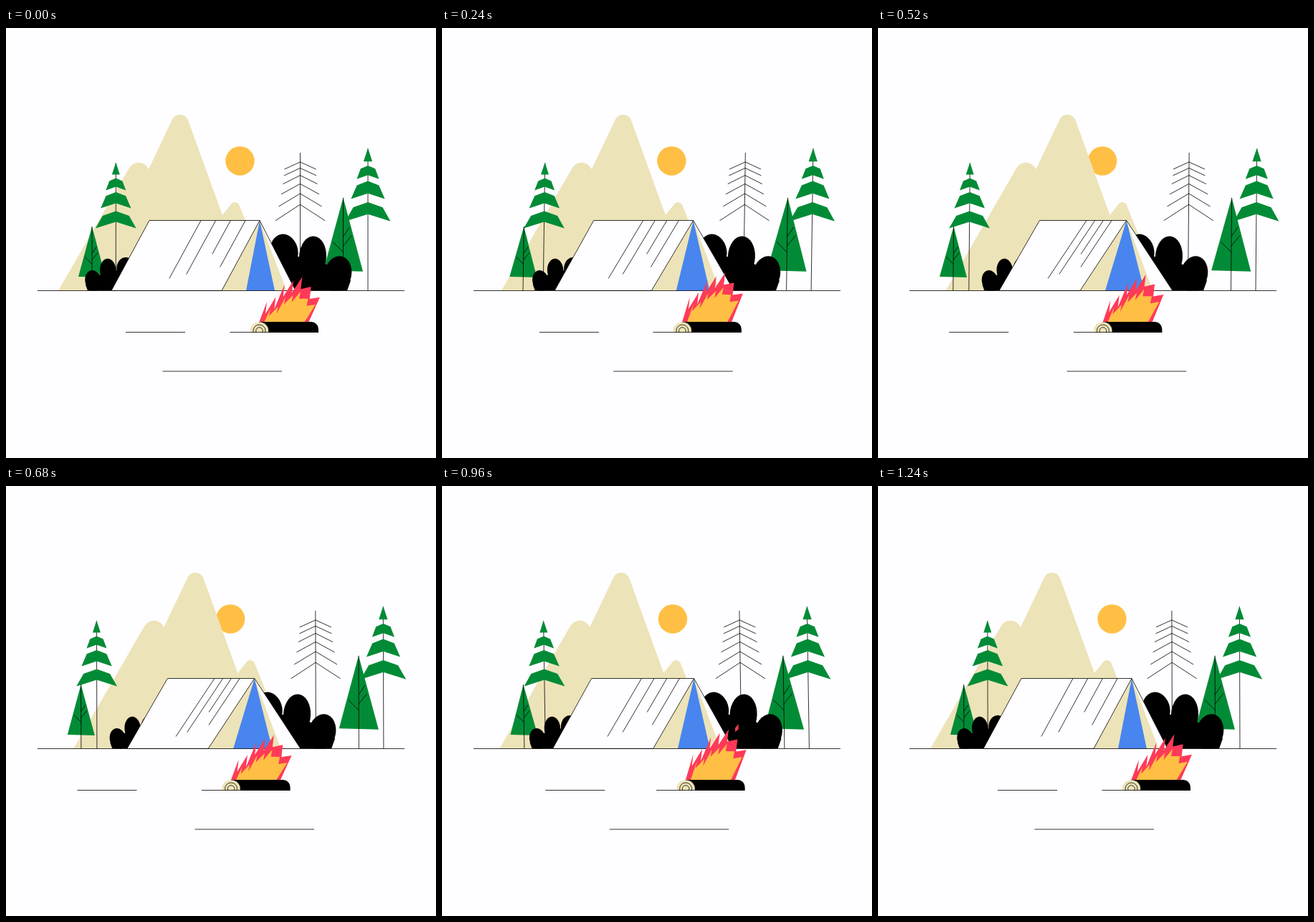
Write an HTML page with a canvas that moves like this. It is 600 by 600 pixels and loops after 1280 ms.

```html
<!DOCTYPE html>
<html lang="en">
<head>
<meta charset="utf-8">
<title>Campsite</title>
<style>
  html, body { margin: 0; width: 100%; height: 100%; overflow: hidden; background: #fefdff; }
  canvas { display: block; width: 600px; height: 600px; }
</style>
</head>
<body>
<canvas id="stage" width="600" height="600"></canvas>
<script>
const ctx = document.getElementById('stage').getContext('2d');
const LOOP = 1280, STEP = 40, GROUND = 366.5, LINE = 0.8;
const PAPER = '#fefdff', SAND = '#ede3b8', GREEN = '#028b36', BLACK = '#000';
const AMBER = '#ffbf44', RED = '#ff3a58', BLUE = '#4885ee';

// Pan: ease out, rest, ease back
const smooth = u => { u = Math.min(1, Math.max(0, u)); return u * u * (3 - 2 * u); };
const pan = t => smooth(t / 508) - smooth((t - 661) / 490);

function poly(points, fill) {
  ctx.beginPath();
  points.forEach(p => ctx.lineTo(...p));
  ctx.closePath();
  if (!fill) return ctx.stroke();
  ctx.fillStyle = fill;
  ctx.fill();
}

function line(...xy) {
  ctx.beginPath();
  for (let i = 0; i < xy.length; i += 2) ctx.lineTo(xy[i], xy[i + 1]);
  ctx.stroke();
}

function oval(x, y, rx, ry, fill, turn = 0) {
  ctx.beginPath();
  ctx.ellipse(x, y, rx, ry, turn, 0, 7);
  ctx.fillStyle = fill;
  ctx.fill();
}

function shifted(dx, draw) {
  ctx.save();
  ctx.translate(dx, 0);
  draw();
  ctx.restore();
}

// Draws from a foot on the ground, upright at y < 0; lean is a shear
function planted(x, scale, lean, draw) {
  ctx.save();
  ctx.transform(scale, 0, -lean * scale, Math.abs(scale), x, GROUND);
  ctx.lineWidth = LINE / Math.abs(scale);
  draw();
  ctx.restore();
}

function mountains() {
  ctx.beginPath();
  ctx.moveTo(73, GROUND);
  ctx.arcTo(184.2, 174, 199, 197, 15);
  ctx.lineTo(199, 197);
  ctx.arcTo(244.3, 101.8, 302, 261, 12);
  ctx.lineTo(302, 261);
  ctx.arcTo(321.4, 236.8, 373, GROUND, 6.5);
  ctx.lineTo(373, GROUND);
  ctx.fillStyle = SAND;
  ctx.fill();
}

function bareTree() {
  line(0, 0, 0, -192.5);
  for (let i = 0; i < 6; i++) {
    const grow = i * i / 2, w = 22 + grow, y = 7.6 * i + 1.7 * grow - 179.5;
    line(-w, y + 10 + grow, 0, y, w, y + 10 + grow);
  }
}

function tallPine() {
  line(0, 0, 0, -178);
  poly([[0, -179], [5.5, -162], [-5.5, -162]], GREEN);
  for (let i = 0; i < 3; i++) {
    const peak = 16 * i + 3.5 * i * i - 157, w = 14 + 7.2 * i;
    const shoulder = peak + 4 + 1.2 * i, tip = peak + 17 + 7.5 * i - 2 * i * i;
    poly([[0, peak], [w * 0.65, shoulder], [w, tip], [0, tip - 5 - 2 * i], [-w, tip], [-w * 0.65, shoulder]], GREEN);
  }
}

function smallPine() {
  poly([[0, -89.5], [19, -18.5], [-19, -19.5]], GREEN);
  line(0, 0, 0, -89.5);
  line(0, -52, 6, -61);
  line(0, -43, 8, -53);
  line(-10, -47, 0, -37);
}

function bush() {
  ctx.beginPath();
  ctx.rect(-90, -100, 180, 100);
  ctx.clip();
  oval(-40, -54, 19.5, 25, BLACK, -0.15);
  oval(0, -47.5, 19, 28.5, BLACK, 0.05);
  oval(35, -23, 19, 25.5, BLACK, 0.2);
  poly([[-56, 0], [-56, -50], [0, -46], [36, -28], [53, -14], [48, 0]], BLACK);
}

function tent(p) {
  const spot = (x, dx, y = GROUND) => [x + dx * p, y], top = 268.5;
  const ridge = spot(200, 25.5, top), apex = spot(354, -7.3, top);
  const back = spot(147, 22), front = spot(301, -19), flap = spot(404, 7);
  poly([ridge, apex, flap, back], PAPER);
  poly([apex, front, spot(391.5, -8)], SAND);
  poly([apex, spot(335, -18), spot(375, -3.5)], BLUE);
  poly([ridge, apex, front, back]);
  line(...apex, ...flap);
  [81, 75, 47, 65].forEach((drop, i) => {
    const x = 272 + 20.7 * i + (19 - 9 * i) * p;
    line(x, top, x - drop * (0.545 + 0.12 * p), top + drop);
  });
}

// Row of right-leaning tongues under an arch that peaks past the middle
function flame(t, fill, [left, right], [first, last], low, rise, cut) {
  const count = 7, base = 411, points = [[left, base]];
  for (let i = 0; i < count; i++) {
    const u = i / (count - 1), x = first + (last - first) * u;
    const flicker = 4 - 4 * Math.cos(4 * Math.PI * t / LOOP - 0.4 * u);
    const h = low + 6 * u + rise * Math.sin(Math.PI * u ** 1.3) - 4 * (i % 2) + flicker;
    points.push([x, base - h]);
    if (i < count - 1) points.push([x - 2, base - h + cut]);
  }
  poly([...points, [right, base]], fill);
}

function spark(t) {
  const u = (t % (LOOP / 2) - 260) / 240;
  if (u < 0 || u > 1) return;
  const h = 7.5 * (1 - u), w = h * 0.4, x = 424 + 3 * u, y = 344 - 26 * u;
  poly([[x + w, y - h], [x + w, y + h * 0.3], [x - w, y + h], [x - w, y]], RED);
}

function campfire(t) {
  flame(t, RED, [353, 422], [364, 438], 29, 32, 17);
  flame(t, AMBER, [360, 416], [369, 432], 19, 21, 10);
  spark(t);
  line(312.5, 424.5, 345, 424.5);
  ctx.beginPath();
  ctx.roundRect(353, 410, 83, 15, [0, 10, 0, 0]);
  ctx.fillStyle = BLACK;
  ctx.fill();
  ctx.beginPath();
  ctx.rect(330, 400, 50, 25);
  ctx.clip();
  oval(353.5, 422.5, 12.7, 12.2, SAND);
  for (const r of [8.5, 4.8]) {
    ctx.beginPath();
    ctx.arc(353.5, 422.5, r, 0, 7);
    ctx.stroke();
  }
  line(341, 424.5, 366, 424.5);
}

function render(t) {
  const p = pan(t), lean = 0.0155 * Math.sin(2 * Math.PI * t / LOOP);
  ctx.fillStyle = PAPER;
  ctx.fillRect(0, 0, 600, 600);
  ctx.strokeStyle = BLACK;
  ctx.lineWidth = LINE;

  oval(326.5 - 13.4 * p, 185.5, 20.2, 20.2, AMBER);
  shifted(21.5 * p, mountains);
  planted(410.5 + 22 * p, 1, lean, bareTree);
  planted(153.3 - 26.5 * p, 1, lean, tallPine);
  planted(505 + 22 * p, 1.112, lean, tallPine);
  planted(120 - 15.2 * p, 1, lean, smallPine);
  planted(470.5 + 22 * p, 1.45, lean, smallPine);
  planted(142.3 + 34.5 * p, -0.59, 0, bush);
  planted(428 - 22 * p, 1, 0, bush);
  tent(p);

  line(44, GROUND, 556, GROUND);
  shifted(-67.8 * p, () => line(167, 424.5, 250, 424.5));
  shifted(45.2 * p, () => line(218.5, 479, 385, 479));
  shifted(-39.6 * p, () => campfire(t));
}

const start = performance.now();
function tick() {
  const t = (performance.now() - start) % LOOP;
  render(Math.floor(t / STEP) * STEP);
  requestAnimationFrame(tick);
}
tick();
</script>
</body>
</html>
```
